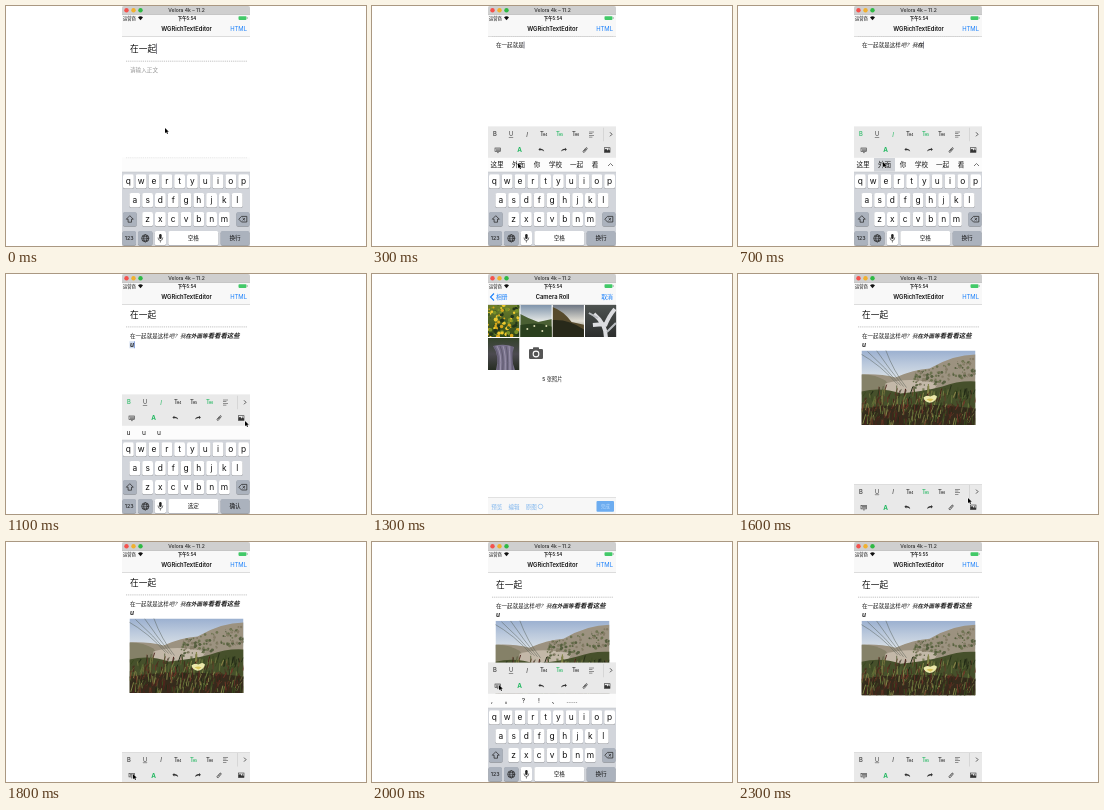
Write an HTML page with a canvas that moves like this. It is 360x240 px and loops after 2.4 s.

```html
<!DOCTYPE html>
<html lang="zh-CN">
<head>
<meta charset="utf-8">
<title>Rich text editor</title>
<style>
html, body { margin: 0; width: 360px; height: 240px; overflow: hidden; background: #fff }
canvas { display: block; width: 360px; height: 240px }
</style>
</head>
<body>
<canvas id="stage"></canvas>
<script>
const canvas = document.getElementById('stage');
const c = canvas.getContext('2d');
const dpr = window.devicePixelRatio || 1;
canvas.width = 360 * dpr;
canvas.height = 240 * dpr;

const FONT = 'Inter, "Noto Sans CJK SC", "Noto Sans CJK", sans-serif';
const BLUE = '#167efb', GREEN = '#22b860', INK = '#333';
const BODY = '在一起就是这样吧？我在外面等看看看这些';

// Steps of 100 ms at which the screen changes
const COMPOSE = 1, NEW_LINE = 11, GALLERY = 12, SELECTED = 14, INSERTED = 16, REOPEN = 19, CLOSE = 21, MINUTE = 23;

// Pointer stops: step, x, y
const STOPS = [[0, 159, 122], [2, 146, 157], [4, 146, 157], [5, 155, 128], [6, 123, 128], [7, 145, 156],
  [8, 145, 156], [10, 203, 128], [11, 239, 147], [14, 232, 231], [16, 230, 224], [18, 127, 232], [20, 127, 143]];

function pointerAt(n) {
  const i = STOPS.findIndex(s => s[0] >= n);
  if (i < 1) return STOPS.at(i).slice(1);
  const [a, x0, y0] = STOPS[i - 1], [b, x1, y1] = STOPS[i];
  const k = (n - a) / (b - a);
  return [x0 + (x1 - x0) * k, y0 + (y1 - y0) * k];
}

function rect(x, y, w, h, color, r = 0) {
  c.fillStyle = color;
  c.beginPath();
  c.roundRect(x, y, w, h, r);
  c.fill();
}
function dot(x, y, r, color) {
  c.fillStyle = color;
  c.beginPath();
  c.arc(x, y, r, 0, 7);
  c.fill();
}
// Vertical centre of the glyphs lies at y
function text(s, x, y, size, color = '#000', align = 'center', style = '') {
  c.font = `${style} ${size}px ${FONT}`;
  c.textAlign = align;
  c.fillStyle = color;
  c.fillText(s, x, y + size * .37);
  return c.measureText(s).width;
}
function path(d, color, width = 0, x = 0, y = 0) {
  const p = new Path2D(d);
  c.save();
  c.translate(x, y);
  if (width) {
    c.strokeStyle = color;
    c.lineWidth = width;
    c.stroke(p);
  } else {
    c.fillStyle = color;
    c.fill(p);
  }
  c.restore();
}
function dashed(y, color = '#aaa') {
  c.setLineDash([1.2, .9]);
  path(`M120 ${y}H241`, color, .7);
  c.setLineDash([]);
}
function clipped(x, y, w, h, draw) {
  c.save();
  c.beginPath();
  c.rect(x, y, w, h);
  c.clip();
  c.translate(x, y);
  draw();
  c.restore();
}
function gradient(w, h, ...colors) {
  const g = c.createLinearGradient(0, 0, 0, h);
  colors.forEach((k, i) => g.addColorStop(i / (colors.length - 1), k));
  rect(0, 0, w, h, g);
}
function random(seed) {
  return () => (seed = seed * 16807 % 2147483647) / 2147483647;
}

function header(n, title, right, back) {
  rect(116, 0, 128, 240, '#fff');
  rect(116, 0, 128, 30, '#f8f8f8');
  rect(116, 0, 128, 8.6, '#cfcfcf', [2, 2, 0, 0]);
  rect(116, 8.2, 128, .5, '#aaa');
  ['#f4524d', '#f0b02f', '#2fb944'].forEach((k, i) => dot(120.5 + i * 7, 4.3, 2.2, k));
  text('Velora 4k – 11.2', 180.5, 4.3, 5, '#2c2c2c', 'center', '500');
  text('运营商', 117, 12, 4.3, '#111', 'left', '500');
  path('M-2.5 -1Q0 -3 2.5 -1L0 2Z', '#111', 0, 134.5, 12.2);
  text(n < MINUTE ? '下午5:54' : '下午5:55', 181, 12, 4.4, '#111', 'center', '600');
  rect(232.5, 10.2, 8, 3.7, '#42c968', .8);
  rect(241, 11.3, .7, 1.5, '#999');
  text(title, 180.5, 23.3, 5.8, '#111', 'center', '600');
  text(right, 241, 23.3, 5.9, BLUE, 'right', back ? '500' : '');
  if (back) {
    path('M122 19.5L118.5 23L122 26.5', BLUE, 1.1);
    text(back, 124, 23.3, 5.8, BLUE, 'left', '500');
  }
  rect(116, 30, 128, .5, '#b9b9b9');
}

function dunes(x, y) {
  clipped(x, y, 114, 74.5, () => {
    const rnd = random(19);
    gradient(114, 28, '#9bb0d0', '#bccadd', '#d9e0e6');
    path('M0 24Q18 23 34 27Q52 19 68 18Q92 4 114 4V75H0Z', '#9c9280');
    path('M0 24Q12 23 24 30L34 44H0Z', '#858168');
    path('M24 33Q46 26 76 33L70 44L24 45Z', '#c3b8a8');
    for (let i = 0; i < 150; i++) {
      const dx = 52 + rnd() * 62;
      dot(dx, 22 - (dx - 52) * .25 + rnd() * 18, .5 + rnd(), ['#6d7350', '#565f3f', '#857c66'][i % 3]);
    }
    path('M0 41Q20 36 39 43Q62 41 81 36Q97 30 114 31V75H0Z', '#46502b');
    path('M0 58Q50 50 114 58V75H0Z', '#352b1c');
    const tones = ['#232b16', '#66743a', '#6d3527', '#3b4a20', '#858648', '#4b231b'];
    for (let i = 0; i < 420; i++) {
      const gx = rnd() * 114, gy = 43 + rnd() * 38, h = 3 + rnd() * 7;
      path(`M${gx} ${gy}l${rnd() * 4 - 1} ${-h}`, tones[i % 6], .5 + rnd() * .6);
    }
    for (let i = 0; i < 4; i++)
      path(`M${i * 9 - 3} ${2 - i}Q${20 + i * 4} ${15 + i * 2} ${36 + i * 3} ${34 + i}`, '#50584f', .45);
    path('M62 47Q65 44 69 46Q73 43 75.5 46Q74 52 68 52.3Q62.5 51 62 47Z', '#ece8ac');
    path('M65 49Q69 47 72 49L69 51Z', '#d9c65c');
  });
}

const thumbs = [
  () => {
    const rnd = random(7);
    gradient(32, 32, '#6d7f2c', '#30491a');
    for (let i = 0; i < 100; i++)
      dot(rnd() * 32, rnd() * 32, .7 + rnd() * 1.4, ['#d9a81c', '#79912a', '#24361a', '#3f5c22', '#efc92e'][i % 5]);
  },
  () => {
    gradient(32, 32, '#7f94ab', '#e3e6e4', '#3c5527');
    path('M0 9L8 13L18 17L32 14V32H0Z', '#4a5f33');
    path('M0 20Q18 16 32 22V32H0Z', '#2b401e');
    [[7, 24], [14, 21], [22, 26], [26, 21]].forEach(p => dot(...p, 1, '#dcdcb4'));
  },
  () => {
    gradient(32, 32, '#6d7683', '#e0ddd2', '#4b4630');
    path('M0 2Q11 6 19 17L32 20V32H0Z', '#574a2c');
    path('M0 15Q17 14 32 25V32H0Z', '#28291a');
  },
  () => {
    gradient(32, 32, '#4d5250', '#2c2e2d');
    path('M21 32Q21 19 9 9M20 21Q24 11 30 4M20 19L8 20', '#dcdde0', 4);
    path('M22 27L31 18M13 13L4 8', '#b9bcc0', 2);
  },
  () => {
    gradient(32, 32, '#33422b', '#4c4a50', '#262d22');
    path('M5 8Q17 5 26 9Q22 20 27 32H8Q12 18 5 8Z', '#77708a');
    for (let i = 0; i < 7; i++)
      path(`M${i * 3 + 6} 8Q${12 + i * 2} 16 ${10 + i * 2.4} 32`, i % 2 ? '#a59db4' : '#5a5567', .8);
  }
];

function gallery(n) {
  const ready = n >= SELECTED, tone = ready ? BLUE : '#7cb4ee';
  header(n, 'Camera Roll', '取消', '相册');
  thumbs.forEach((draw, i) =>
    clipped(116 + i % 4 * 32.3, 31 + (i >> 2) * 33, 31.3, 32, draw));
  rect(157, 75, 14, 10, '#555', 1.3);
  rect(161, 73.3, 6, 3, '#555', .7);
  dot(164, 80, 3.4, '#fff');
  dot(164, 80, 2.3, '#555');
  text('5 张照片', 180.3, 105, 5.2, '#222', 'center', '500');
  rect(116, 223, 128, 17, '#f7f7f7');
  rect(116, 223, 128, .5, '#ccc');
  ['预览', '编辑', '原图'].forEach((s, i) => text(s, 119.3 + i * 17.2, 232.5, 5.5, tone, 'left'));
  c.beginPath();
  c.arc(168.5, 232.5, 2.3, 0, 7);
  c.strokeStyle = tone;
  c.lineWidth = .6;
  c.stroke();
  rect(224.5, 227, 17.5, 10.8, ready ? BLUE : '#6cacf0', 1);
  text('完成', 233.3, 232.5, 4.6, ready ? '#fff' : '#b9dbff');
}

function page(n) {
  const shift = n < COMPOSE || n >= REOPEN ? 0 : n < NEW_LINE ? -25 : -2.3;
  const typed = n < NEW_LINE ? Math.round(n * 11 / 7) : BODY.length;
  clipped(116, 30.5, 128, 210, () => {
    c.translate(-116, -30.5 + shift);
    const w = text('在一起', 124, 42.8, 8.7, '#111', 'left', '500');
    if (!n) rect(124 + w, 37.5, .6, 10.5, '#334');
    dashed(55.2);
    if (!typed) text('请输入正文', 124, 64, 5.6, '#999', 'left');
    let x = 124;
    [...BODY].slice(0, typed).forEach((ch, i) => {
      const style = (i > 6 ? 'italic ' : '') + (i > 9 ? 700 : 400);
      x += text(ch, x, 64, i > 13 ? 6.4 : 5.55, '#1c1c1c', 'left', style);
    });
    if (n && n < NEW_LINE) rect(x, 60.5, .6, 7, '#334');
    if (n >= NEW_LINE) {
      const composing = n === NEW_LINE;
      if (composing) rect(123.5, 69.5, 4.5, 7, '#cfdcef');
      const u = text('u', 124, 73, 6.4, '#222', 'left', 'italic 700');
      if (composing) rect(124 + u, 69.5, .6, 7, '#345fc0');
    }
    if (n >= INSERTED) dunes(123.5, 78.8);
  });
}

function toolbar(n, y) {
  rect(116, y, 128, 31, '#e9e9e9');
  rect(116, y, 128, .4, '#d2d2d2');
  const a = y + 7.6, b = y + 23.3;
  const on = k => k ? GREEN : INK;
  text('B', 123, a, 5.8, on(n > 5 && n < GALLERY), 'center', '500');
  text('U', 139, a, 5.6, INK);
  rect(136.8, a + 3, 4.4, .5, INK);
  text('I', 155, a, 6, on(n > 4 && n < GALLERY), 'center', 'italic');
  const level = n > 9 && n < GALLERY ? 2 : 1;
  for (let i = 0; i < 3; i++) {
    text('T', 170 + i * 16, a, 5.8, on(i === level), 'center', '500');
    text('H' + (i + 4), 173.1 + i * 16, a + 1.1, 2.9, on(i === level), 'center', '700');
  }
  for (let i = 0; i < 4; i++) rect(217, a - 2.6 + i * 1.7, i % 2 ? 3.4 : 5, .6, '#555');
  rect(231.5, y + 1, .5, 13.5, '#c4c4c4');
  path('M238 -2L240 0L238 2', INK, .8, 0, a);
  c.strokeStyle = INK;
  c.lineWidth = .6;
  c.strokeRect(123, b - 2, 5.5, 3.6);
  path('M124 -.8H128M124 .4H128M125 2.6H126.8', INK, .6, 0, b);
  text('A', 147.5, b, 6.3, GREEN, 'center', '700');
  const undo = 'M-2.9 -.6L-1 -2.2V-1.2Q2.2 -1.4 2.9 1.6Q1.4 -.1 -1 .1V1.1Z';
  path(undo, INK, 0, 169.3, b);
  c.save();
  c.translate(192, b);
  c.scale(-1, 1);
  path(undo, INK);
  c.restore();
  path('M-2 1.2L1 -2.2Q2.2 -2.7 2.2 -1.2L-.7 2.3Q-2 2.7 -2 1.2M-.9 1L1 -1', INK, .7, 213, b);
  c.strokeRect(232.5, b - 2.3, 5.5, 4.6);
  path('M232.5 2.2V-.2L234.2 -1.2L235.7 .5L236.7 -.4L238 .6V2.3Z', INK, 0, 0, b);
  dot(236.6, b - 1.1, .5, INK);
}

function key(x, y, w, label, size = 8.4, dark = false) {
  rect(x, y + .5, w, 14.3, '#888b90', 1.7);
  rect(x, y, w, 14.3, dark ? '#abb2bd' : '#fff', 1.7);
  text(label, x + w / 2, y + (size > 7 ? 6.6 : 7.2), size, '#111');
}

function keyboard(n) {
  rect(116, 151.5, 128, 15, '#fcfcfc');
  if (!n) dashed(151.8, '#ddd');
  const late = n >= REOPEN, composing = n === NEW_LINE;
  const words = late ? [',', '。', '?', '!', '、', '……']
    : composing ? ['u', 'u', 'u'] : ['这里', '外面', '你', '学校', '一起', '看'];
  const xs = late ? [120, 136, 151.5, 167, 183, 200]
    : composing ? [122.5, 138, 153] : [125, 146.5, 165, 183.5, 204.5, 223];
  if (n) {
    if (n === 7) rect(136, 152, 21, 13.5, '#d0d3d8');
    words.forEach((s, i) => text(s, xs[i], 158.5, 6.6, '#111'));
    if (n < NEW_LINE) path('M236 160L238.5 157.5L241 160', '#555', .8);
  }
  rect(116, 166, 128, 74, '#d2d5db');
  rect(116, 165.7, 128, .5, '#bbbec3');
  ['qwertyuiop', 'asdfghjkl', 'zxcvbnm'].forEach((row, r) =>
    [...row].forEach((ch, i) =>
      key(180 + (i - row.length / 2) * 12.8 + 1, 168.2 + r * 18.9, 10.8, ch)));
  key(117, 206, 13.7, '', 5, true);
  path('M-3.5 0L0 -3.5L3.5 0H1.7V3H-1.7V0Z', '#222', .7, 123.8, 213.2);
  key(230.4, 206, 13, '', 5, true);
  path('M-4 0L-1.3 -2.8H4V2.8H-1.3ZM-.2 -1.2L2.2 1.2M2.2 -1.2L-.2 1.2', '#222', .7, 236.8, 213.2);
  key(116.5, 225, 13.5, '123', 5.4, true);
  key(132, 225, 14.5, '', 5, true);
  c.beginPath();
  c.arc(139.3, 232.3, 3.6, 0, 7);
  c.ellipse(139.3, 232.3, 1.6, 3.6, 0, 0, 7);
  c.strokeStyle = '#222';
  c.lineWidth = .7;
  c.stroke();
  path('M135.7 232.3H142.9M136.4 230.4H142.2M136.4 234.2H142.2', '#222', .6);
  key(148.7, 225, 11.3, '');
  rect(153.2, 228, 2.4, 5, '#222', 1.2);
  path('M152 231.5Q152 234.5 154.4 234.5T156.8 231.5M154.4 234.5V236.5', '#222', .6);
  key(162.3, 225, 50, composing ? '选定' : '空格', 5.6);
  key(214.7, 225, 28.7, composing ? '确认' : '换行', 5.6, true);
}

function pointer(n) {
  const [x, y] = pointerAt(n);
  const arrow = 'M0 0V5.2L1.2 4.1L2.1 6L3 5.6L2.2 3.8H3.8Z';
  path(arrow, '#fff', .8, x, y);
  path(arrow, '#000', 0, x, y);
}

function draw(n) {
  c.setTransform(dpr, 0, 0, dpr, 0, 0);
  rect(0, 0, 360, 240, '#fff');
  if (n >= GALLERY && n < INSERTED) gallery(n);
  else {
    header(n, 'WGRichTextEditor', 'HTML');
    page(n);
    const typing = n < GALLERY || n >= REOPEN && n < CLOSE;
    if (typing) keyboard(n);
    if (n >= COMPOSE) toolbar(n, typing ? 120.7 : 210);
  }
  if (n < GALLERY || n >= SELECTED && n <= CLOSE) pointer(n);
}

const start = performance.now();
function tick() {
  draw(Math.floor((performance.now() - start) % 2400 / 100));
  requestAnimationFrame(tick);
}
tick();
</script>
</body>
</html>
```
